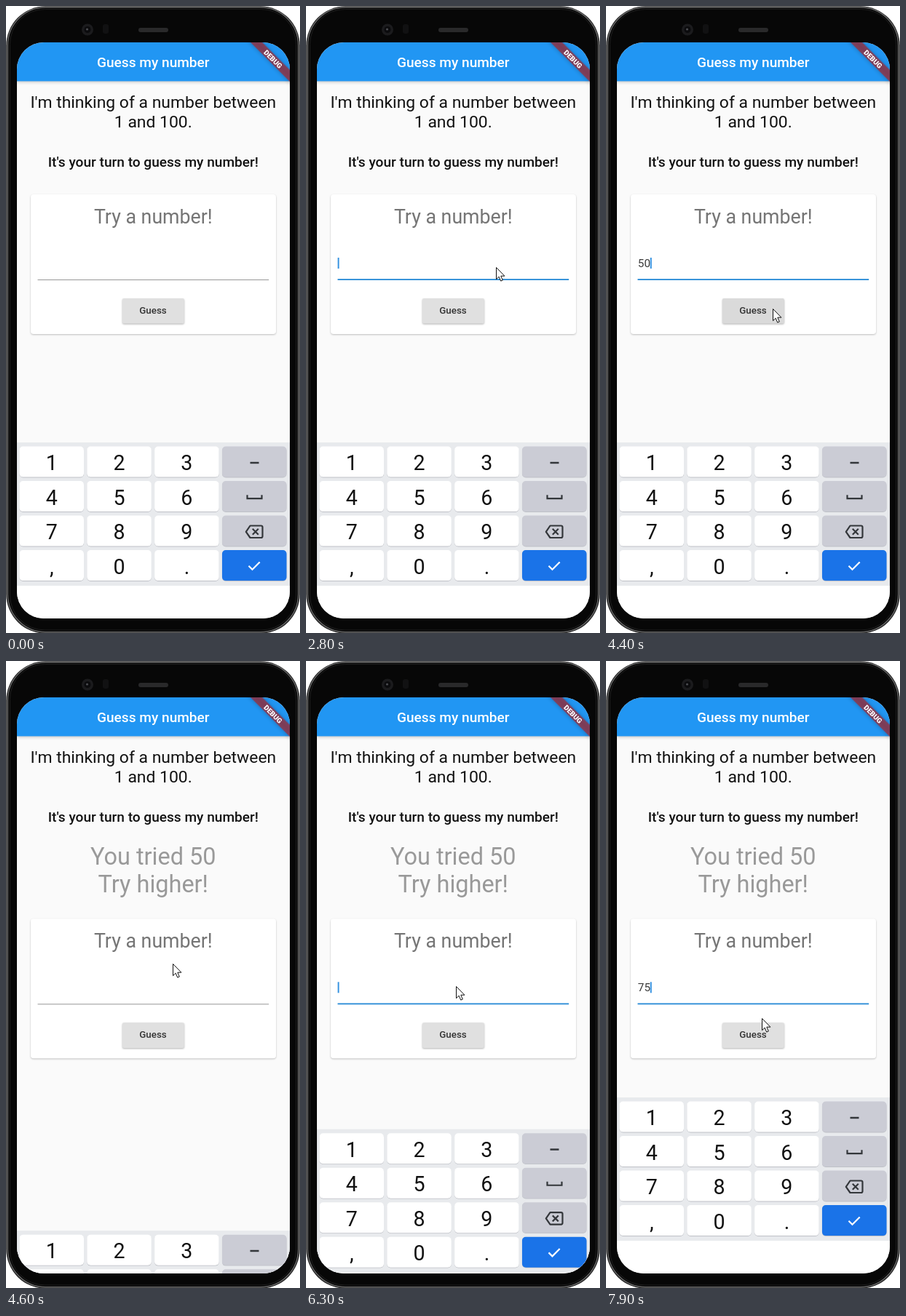
An HTML page for the animation above (8 s loop, 404 by 862 pixels).

```html
<!DOCTYPE html>
<html lang="en">
<head>
<meta charset="utf-8">
<title>Guess my number</title>
<style>
html, body { margin: 0; width: 100%; height: 100%; overflow: hidden; background: #fff; }
svg { display: block; width: 100vw; height: 100vh; font-family: Roboto, sans-serif; }
.mid { text-anchor: middle; }
.bold { font-weight: 500; }
.bar { filter: drop-shadow(0 1.5px 2px rgba(0,0,0,.24)); }
.card { filter: drop-shadow(0 1px 1px rgba(0,0,0,.24)); }
.btn { filter: drop-shadow(0 1.4px 1.2px rgba(0,0,0,.3)); }
.ribbon { filter: drop-shadow(0 0 3px rgba(0,0,0,.4)); }
</style>
</head>
<body>
<svg viewBox="0 0 404 862">
  <defs>
    <clipPath id="screen"><rect x="15" y="50" width="375" height="792" rx="37"/></clipPath>
  </defs>

  <!-- phone body -->
  <rect x=".3" y=".3" width="403.4" height="862.4" rx="54" fill="#232323"/>
  <rect x="2.4" y="1.8" width="399.2" height="859" rx="52" fill="#0a0a0a" stroke="#666" stroke-width="1.4"/>
  <rect x="5.5" y="4.5" width="393" height="853.5" rx="48" fill="#070707" stroke="#1d1d1d"/>
  <circle cx="112" cy="32.5" r="8" fill="#1b1b1d"/>
  <circle cx="112" cy="32.5" r="4.5" fill="#0b0b0d"/>
  <circle cx="111.5" cy="32" r="1.6" fill="#4a4b50"/>
  <rect x="133" y="25" width="8" height="13" rx="3" fill="#111112"/>
  <rect x="182" y="30" width="41" height="6" rx="3" fill="#29292a"/>

  <g clip-path="url(#screen)">
    <rect x="15" y="50" width="375" height="792" fill="#fafafa"/>
    <rect class="bar" x="15" y="50" width="375" height="53.4" fill="#2196f3"/>
    <text class="mid bold" x="202.3" y="83.8" font-size="19.1" fill="#fff">Guess my number</text>

    <g class="mid" font-size="22.92" fill="#111">
      <text x="202.3" y="139.6">I'm thinking of a number between</text>
      <text x="202.3" y="166.5">1 and 100.</text>
    </g>
    <text class="mid bold" x="202.3" y="220.5" font-size="19.1" fill="#111">It's your turn to guess my number!</text>

    <g id="hint" class="mid" font-size="32.47" fill="#999">
      <text x="202.3" y="280.2">You tried 50</text>
      <text x="202.3" y="318.3">Try higher!</text>
    </g>

    <g id="card">
      <rect class="card" x="34" y="259" width="337" height="192" rx="3.8" fill="#fff"/>
      <text class="mid" x="202.3" y="299.2" font-size="26.74" fill="#757575">Try a number!</text>
      <text id="entry" x="43.8" y="358.6" font-size="15.28" fill="#383838"></text>
      <rect id="caret" y="346" width="1.9" height="15" fill="#2f8fe0"/>
      <rect id="rule" x="43.5" width="317.7"/>
      <rect id="button" class="btn" x="160" y="402" width="84.8" height="34.6" rx="2"/>
      <text class="mid bold" x="202" y="423.2" font-size="13.37" fill="#333">Guess</text>
    </g>

    <g id="keyboard">
      <rect x="15" y="600" width="375" height="262" fill="#fff"/>
      <rect x="15" y="600" width="375" height="197" fill="#e8eaed"/>
      <g id="keys"></g>
      <g fill="none" stroke="#33363a" stroke-width="2.2">
        <path d="M335.5 628H347.5" stroke-width="2.5"/>
        <path d="M331.5 672.3V677.2H351.5V672.3"/>
        <path d="M335.5 714.5H350.5Q352.5 714.5 352.5 716.5V729Q352.5 731 350.5 731H335.5L329.8 722.8Z" stroke-linejoin="round"/>
        <path d="M338.8 718.8L346.8 726.8M346.8 718.8L338.8 726.8"/>
        <path d="M333.5 769.8L338.5 774.8L348.7 764.4" stroke="#fff"/>
      </g>
    </g>

    <g transform="translate(390 50) rotate(45)">
      <rect class="ribbon" x="-50" y="26.7" width="100" height="11.5" fill="#b71c1c" fill-opacity=".63"/>
      <text class="mid" x="0" y="36" font-size="9.74" font-weight="900" fill="#fff">DEBUG</text>
    </g>
  </g>

  <path id="pointer" d="M0 0V16.2L3.7 12.7L6.2 18.6L8.8 17.5L6.3 11.7H11.4Z" fill="#fff" stroke="#111" stroke-linejoin="round"/>
</svg>

<script>
const LOOP = 8000, SUBMIT = 4450, FOCUS_1 = 1900, FOCUS_2 = 6130;
const NS = 'http://www.w3.org/2000/svg';
const el = id => document.getElementById(id);
const [hint, card, entry, caret, rule, button, keyboard, pointer] =
  ['hint', 'card', 'entry', 'caret', 'rule', 'button', 'keyboard', 'pointer'].map(el);

const clamp = v => Math.max(0, Math.min(1, v));
const ramp = (t, from, to) => clamp((t - from) / (to - from));
const smooth = p => p * p * (3 - 2 * p);
const mix = (a, b, p) => a + (b - a) * p;
const set = (node, attrs) => { for (const k in attrs) node.setAttribute(k, attrs[k]); };
const show = (node, on) => set(node, { visibility: on ? 'visible' : 'hidden' });

function add(tag, attrs, text = '') {
  const node = document.createElementNS(NS, tag);
  set(node, attrs);
  node.textContent = text;
  el('keys').append(node);
}

// four rows of keys; the last column holds icons
['123', '456', '789', ',0.'].forEach((labels, row) => {
  for (let col = 0; col < 4; col++) {
    const x = 18.4 + col * 92.85, y = 605.6 + row * 47.5;
    const fill = col < 3 ? '#fff' : row < 3 ? '#cbccd5' : '#1a73e8';
    const box = { x, width: 88.6, height: 42, rx: 5 };
    add('rect', { ...box, y: y + .9, fill: '#bfc1c7' });
    add('rect', { ...box, y, fill });
    if (col < 3) add('text', { class: 'mid', x: x + 44.3, y: y + 32.4, 'font-size': 28.6, fill: '#111' }, labels[col]);
  }
});

// pointer moves: start, end, x, y
const moves = [
  [950, 1800, 261.5, 359.5],
  [3750, 4300, 229.5, 416.5],
  [5220, 5500, 199.5, 429.5],
  [5620, 5800, 206.5, 447.5],
  [7810, 7900, 214.5, 491.5]
];

function pointerAt(t) {
  let x = 406, y = 470;
  for (const [from, to, nx, ny] of moves) {
    const p = smooth(ramp(t, from, to));
    x = mix(x, nx, p);
    y = mix(y, ny, p);
  }
  return [x, y];
}

function typedAt(t) {
  if (t < SUBMIT) return t < 3300 ? '' : t < 3500 ? '5' : '50';
  return t < 7200 ? '' : t < 7500 ? '7' : '75';
}

// the caret restarts its blink at each of these times
const blinkStarts = [FOCUS_1, 3300, 3500, FOCUS_2, 7200, 7500];

function caretAt(t) {
  if (t < FOCUS_1 || (t >= SUBMIT && t < FOCUS_2)) return false;
  const start = blinkStarts.filter(s => s <= t).pop();
  return Math.floor((t - start) / 450) % 2 === 0;
}

function keyboardAt(t) {
  if (t < FOCUS_2) return 242 * smooth(ramp(t, 4470, 4663));
  return 242 * (1 - ramp(t, 6150, 6450)) ** 2.45;
}

function draw(t) {
  const second = t >= SUBMIT;
  show(hint, second);
  set(card, { transform: `translate(0 ${second ? 95.3 : 0})` });

  const text = typedAt(t);
  entry.textContent = text;
  show(caret, caretAt(t));
  set(caret, { x: 43.6 + text.length * 8.6 });

  const focus = t < SUBMIT ? ramp(t, FOCUS_1, FOCUS_1 + 167) : ramp(t, FOCUS_2, FOCUS_2 + 167);
  const height = mix(1, 1.9, focus);
  const rgb = [[152, 47], [152, 143], [152, 216]].map(([a, b]) => Math.round(mix(a, b, focus)));
  set(rule, { y: 377 - height, height, fill: `rgb(${rgb})` });

  set(button, { fill: t >= 4350 && t < SUBMIT ? '#dadada' : '#e0e0e0' });
  set(keyboard, { transform: `translate(0 ${keyboardAt(t)})` });
  set(pointer, { transform: `translate(${pointerAt(t)})` });
}

// the typed caret is still lit when the loop ends
blinkStarts.push(7900);

const begin = performance.now();
function tick() {
  draw((performance.now() - begin) % LOOP);
  requestAnimationFrame(tick);
}
tick();
</script>
</body>
</html>
```
